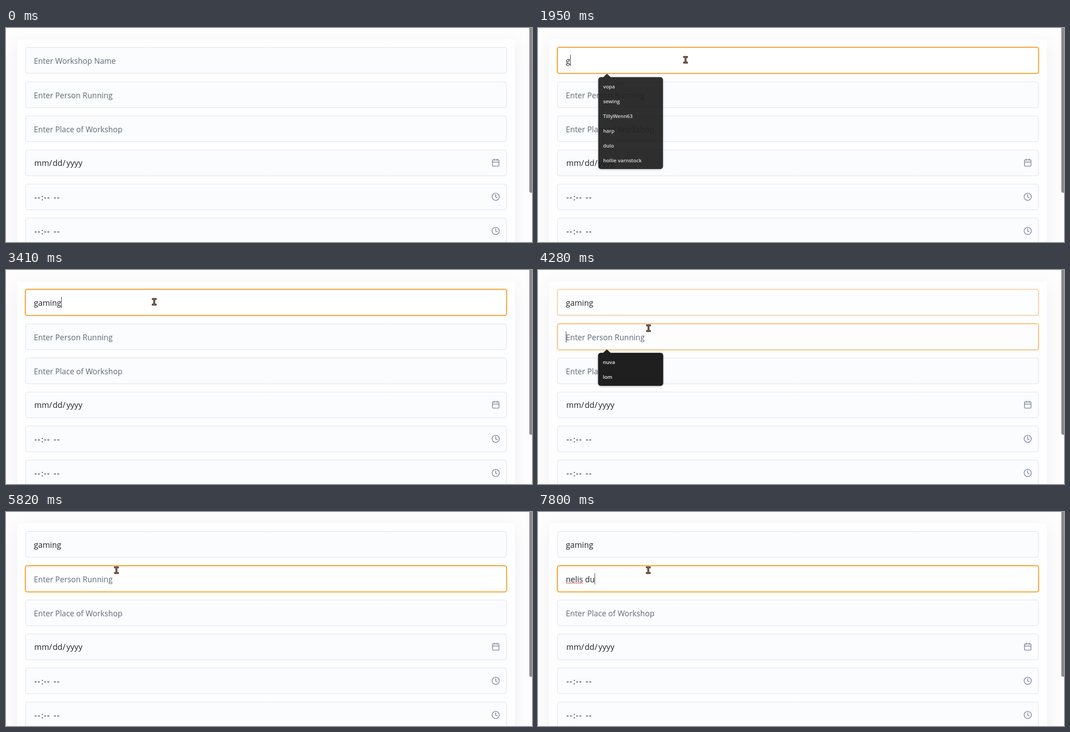
An HTML page with a canvas for the animation above (8000 ms loop, 1171 by 478 pixels).

```html
<!DOCTYPE html>
<html lang="en">
<head>
<meta charset="utf-8">
<title>Workshop form</title>
<style>
html, body { margin: 0; width: 100%; height: 100%; overflow: hidden; background: #fdfdfe; }
canvas { display: block; }
</style>
</head>
<body>
<canvas id="stage" width="1171" height="478"></canvas>
<script>
const c = document.getElementById('stage').getContext('2d');
const LOOP = 8000, STEP = 68.2;
const FONT = '"Open Sans", "Noto Sans", sans-serif';
const HINTS = ['Enter Workshop Name', 'Enter Person Running', 'Enter Place of Workshop'];
const INK = '#212529', GREY = '#5f6a78';

// [time, text in the field, caret shown]
const typing = [
  [[0, '', 0], [1220, '', 1], [1750, '', 0], [1950, 'g', 1], [2090, 'ga', 1], [2220, 'gam', 1],
   [2360, 'gami', 1], [2890, 'gamin', 1], [3020, 'gaming', 1], [3550, 'gaming', 0],
   [4080, 'gaming', 1], [4220, 'gaming', 0]],
  [[0, '', 0], [4220, '', 1], [4750, '', 0], [5210, 'm', 1], [5350, 'me', 1], [5750, 'm', 1],
   [5820, '', 0], [6080, 'n', 1], [6210, 'ne', 1], [6680, 'nel', 1], [6810, 'neli', 1],
   [7010, 'nelis', 1], [7210, 'nelis ', 1], [7730, 'nelis d', 1], [7800, 'nelis du', 1]]
];

const popups = [
  { open: 1215, close: 1930, top: 109, items: ['vopa', 'sewing', 'TillyWenn63', 'harp', 'dulo', 'hollie varnstock'] },
  { open: 4215, close: 5200, top: 185, items: ['nuva', 'lom'] },
  { open: 6140, close: 6210, top: 185, items: ['nuva'] }
];

// [time, x, y]
const path = [[70, 994, 427], [820, 338, 72], [1290, 337.5, 72], [1420, 328.5, 71], [3340, 328.5, 71],
  [3410, 330, 71], [3550, 332, 71], [3740, 332, 71], [4080, 246, 130], [8000, 245.5, 130]];

const clamp = v => Math.max(0, Math.min(1, v));
const ramp = (t, start, length) => clamp((t - start) / length);
const latest = (list, t) => list.filter(k => k[0] <= t).pop();
const fieldTop = i => Math.round(43.4 + 76.2 * i);

function text(s, x, y, color, size = 17.3, weight = 400) {
  c.font = `${weight} ${size}px ${FONT}`;
  c.fillStyle = color;
  c.fillText(s, x, y);
}

function box(x, y, w, h, r) {
  c.beginPath();
  c.roundRect(x, y, w, h, r);
}

function line(...pts) {
  c.beginPath();
  pts.forEach(p => c.lineTo(...p));
  c.stroke();
}

function card() {
  c.fillStyle = '#fdfdfe';
  c.fillRect(0, 0, 1171, 478);
  c.save();
  c.shadowColor = 'rgba(20,30,60,.055)';
  c.shadowBlur = 40;
  c.shadowOffsetY = 8;
  c.fillStyle = '#fefefe';
  box(24.5, 25, 1108.5, 600, 5);
  c.fill();
  c.restore();
  c.fillStyle = '#8a8a8a';
  box(1165, -10, 10, 378, 4);
  c.fill();
}

function field(i, focus) {
  const y = fieldTop(i) + .5;
  box(43.5, y, 1070.5, 57.5, 4);
  c.fillStyle = '#fbfcfe';
  c.fill();
  c.lineWidth = 1;
  c.strokeStyle = '#dbdfe5';
  c.stroke();
  if (!focus) return;
  c.globalAlpha = focus;
  box(43, y - .5, 1071.5, 58.5, 4.5);
  c.fillStyle = '#fff';
  c.fill();
  c.lineWidth = 2;
  c.strokeStyle = '#fb9518';
  c.stroke();
  c.globalAlpha = 1;
}

function entry(i, t) {
  const base = fieldTop(i) + 37;
  const [, value, caret] = i < 2 ? latest(typing[i], t) : [0, '', 0];
  if (value) text(value, 62, base, INK, 17.7);
  else text(HINTS[i], 62, base, GREY);
  if (caret) {
    const x = value ? Math.round(62 + c.measureText(value).width) : 62;
    c.fillStyle = '#333';
    c.fillRect(x, base - 20, 1, 25);
  }
  if (i === 1 && t >= 7210) {
    c.strokeStyle = '#e0323c';
    c.lineWidth = 1;
    line(...Array.from({ length: 20 }, (_, k) => [62 + 2 * k, base + (k % 2 ? 1 : 3)]));
  }
}

function calendar() {
  box(1083, 294.5, 14.5, 14, 1.5);
  c.stroke();
  line([1083, 299.5], [1097.5, 299.5]);
  line([1087, 292], [1087, 296.5]);
  line([1093.5, 292], [1093.5, 296.5]);
}

function clock(y) {
  c.beginPath();
  c.arc(1090.2, y, 8, 0, 7);
  c.stroke();
  line([1090.2, y - 5.5], [1090.2, y + .5], [1094, y + 2.5]);
}

function dateAndTimes() {
  [['mm', 63], ['/', 96], ['dd', 104], ['/', 126], ['yyyy', 134.5]]
    .forEach(([s, x]) => text(s, x, 308, INK, 17.7));
  for (const y of [384.5, 460.5]) {
    for (const x of [63, 70.2, 84, 91.2, 106, 113.2]) text('-', x, y, INK, 19);
    text(':', 78.5, y, INK);
  }
  c.strokeStyle = '#7d889b';
  c.lineWidth = 1.6;
  calendar();
  clock(377);
  clock(453.3);
}

function popup({ open, close, top, items }, t) {
  const gone = ramp(t, close, 200);
  if (t < open || gone === 1) return;
  const h = 8.4 + 33.2 * items.length, cy = top + h / 2, scale = 1 - .06 * gone;
  c.save();
  c.globalAlpha = 1 - gone;
  c.translate(206.2, cy);
  c.scale(scale, scale);
  c.translate(-206.2, -cy);
  c.fillStyle = '#1f1f1f';
  c.shadowColor = 'rgba(0,0,0,.3)';
  c.shadowBlur = 4;
  c.shadowOffsetY = 1;
  box(133.7, top, 145, h - 1, 6);
  c.moveTo(144.5, top + .5);
  c.lineTo(153.3, top - 7.5);
  c.lineTo(162, top + .5);
  c.fill();
  c.shadowColor = 'transparent';
  items.forEach((s, i) => text(s, 144.5, top + 25.2 + 33.2 * i, '#f3f3f3', 11.3, 600));
  c.restore();
}

function pointer(t) {
  t = Math.floor((t + 4) / STEP) * STEP + 4;
  if (t < 70) return;
  const k = Math.max(0, path.findIndex(p => p[0] > t) - 1);
  const [t0, x0, y0] = path[k], [t1, x1, y1] = path[k + 1];
  const u = ramp(t, t0, t1 - t0), e = u * u * (3 - 2 * u);
  const x = x0 + (x1 - x0) * e, y = y0 + (y1 - y0) * e;
  const beam = (color, grow) => {
    c.fillStyle = color;
    for (const [dx, dy, w, h] of [[-4, -7, 8, 1.4], [-.8, -7, 1.6, 14], [-4, 5.6, 8, 1.4]])
      c.fillRect(x + dx - grow, y + dy - grow, w + 2 * grow, h + 2 * grow);
  };
  beam('#2a2522', 1.2);
  beam('#a8714a', 0);
}

function draw(now) {
  const t = now % LOOP;
  const second = ramp(t, 4170, 180);
  const focus = [ramp(t, 1245, 175) - second, second];
  card();
  for (let i = 0; i < 6; i++) field(i, focus[i]);
  for (let i = 0; i < 3; i++) entry(i, t);
  dateAndTimes();
  popups.forEach(p => popup(p, t));
  pointer(t);
  requestAnimationFrame(draw);
}
requestAnimationFrame(draw);
</script>
</body>
</html>
```
